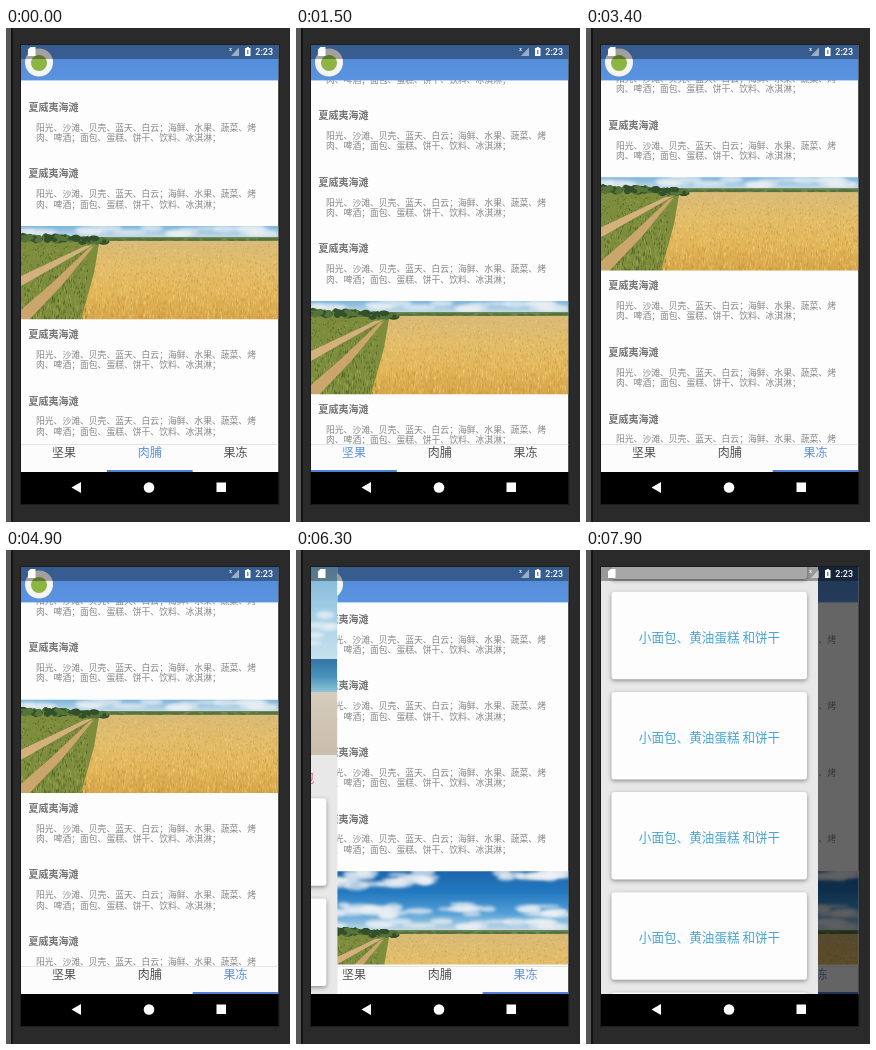
Recreate the animation shown at these times as an HTML page with a canvas. Size 284x494 px, loop 8000 ms.

```html
<!DOCTYPE html>
<html lang="zh-CN">
<head>
<meta charset="utf-8">
<style>
html, body { margin: 0; width: 284px; height: 494px; overflow: hidden; background: #2a2a2a; }
canvas { display: block; width: 284px; height: 494px; }
</style>
</head>
<body>
<canvas id="stage"></canvas>
<script>
const W = 284, H = 494, LOOP = 8000, STEP = 100;
const X = 15, PAGE_W = 257.5, TOP = 17, BAR = 31, LIST = 52.4, TABS = 416, NAV = 444, END = 476;
const ITEM_H = 66.6, PHOTO_H = 93.3, PHOTO_REST = 321.2, PHOTO_SHIFT = 48;
const DRAWER_W = 217, CARD_GAP = 100.2, CARD_SCROLL = 306.8;
const FONT = '"Noto Sans CJK SC", "Noto Sans CJK", sans-serif';
const UI_FONT = 'Roboto, sans-serif';

const dpr = window.devicePixelRatio || 1;
const canvas = document.getElementById('stage');
canvas.width = W * dpr;
canvas.height = H * dpr;
const ctx = canvas.getContext('2d');
const clamp = (v, a, b) => Math.min(b, Math.max(a, v));
const mix = (a, b, k) => a + (b - a) * k;

// Eased progress from 0 to 1; a power above 1 delays the speed peak
function ease(t, start, end, power = 1) {
  const k = clamp((t - start) / (end - start), 0, 1) ** power;
  return k * k * (3 - 2 * k);
}

const pagerAt = t => 1 - ease(t, 1300, 1500) + 2 * ease(t, 3100, 3400);
const scrollAt = [
  t => mix(273, PHOTO_REST, ease(t, 2100, 2700)),
  t => mix(198, 150, ease(t, 400, 1300)),
  t => mix(149.3, PHOTO_REST, ease(t, 4800, 5900, 1.44))
];
const drawerAt = t => DRAWER_W * ease(t, 6200, 6800, .85);
const drawerScrollAt = t => CARD_SCROLL * ease(t, 7500, 7900);

function random(seed) {
  return () => (seed = (seed * 16807) % 2147483647) / 2147483647;
}

function rect(g, x, y, w, h, fill) {
  g.fillStyle = fill;
  g.fillRect(x, y, w, h);
}

function oval(g, x, y, rx, ry, fill) {
  g.fillStyle = fill;
  g.beginPath();
  g.ellipse(x, y, rx, ry, 0, 0, Math.PI * 2);
  g.fill();
}

function poly(g, fill, ...p) {
  g.fillStyle = fill;
  g.beginPath();
  for (let i = 0; i < p.length; i += 2) g.lineTo(p[i], p[i + 1]);
  g.fill();
}

function gradient(g, y0, y1, ...colors) {
  const fill = g.createLinearGradient(0, y0, 0, y1);
  colors.forEach((c, i) => fill.addColorStop(i / (colors.length - 1), c));
  return fill;
}

function text(s, x, y, size, color, align = 'left', weight = 400, font = FONT) {
  ctx.font = `${weight} ${size}px ${font}`;
  ctx.textAlign = align;
  ctx.fillStyle = color;
  ctx.fillText(s, x, y + size * .37);
}

function clipped(x, y, w, h, draw) {
  ctx.save();
  ctx.beginPath();
  ctx.rect(x, y, w, h);
  ctx.clip();
  draw();
  ctx.restore();
}

function picture(w, h, draw) {
  const c = document.createElement('canvas');
  c.width = w * 2;
  c.height = h * 2;
  const g = c.getContext('2d');
  g.scale(2, 2);
  draw(g, w, h);
  return c;
}

function clouds(g, rnd, n, x, y, w, h) {
  g.save();
  g.filter = 'blur(3px)';
  for (let i = 0; i < n; i++) {
    oval(g, x + rnd() * w, y + rnd() * h, 6 + rnd() * 12, 1.5 + rnd() * 3, 'rgba(240,243,246,.7)');
  }
  g.restore();
}

function specks(g, rnd, n, x, y, w, h, light, dark) {
  for (let i = 0; i < n; i++) {
    const d = rnd();
    rect(g, x + rnd() * w, y + d * h, .8, 1 + d * 3, rnd() < .5 ? light : dark);
  }
}

const field = picture(258, 142, (g, w, h) => {
  const rnd = random(77);
  rect(g, 0, 0, w, 63, gradient(g, 0, 63, '#1d66ac', '#2479c0', '#539fd6', '#dce8ec'));
  clouds(g, rnd, 26, 15, 0, 100, 15);
  clouds(g, rnd, 14, 190, 0, 70, 10);
  clouds(g, rnd, 30, 20, 33, 240, 12);
  clouds(g, rnd, 16, 0, 50, w, 6);

  rect(g, 0, 59, w, 5, '#6f8750');
  rect(g, 0, 63, w, h - 63, gradient(g, 63, h, '#d9bb78', '#e2bd69', '#e2b659', '#d6a548'));
  specks(g, rnd, 1800, 62, 65, 196, 77, 'rgba(250,222,145,.4)', 'rgba(176,122,42,.3)');

  poly(g, '#7d8d3d', 0, 62, 74, 62, 78, 66, 73, 95, 60, h, 0, h);
  specks(g, rnd, 700, 0, 66, 66, 76, 'rgba(170,176,84,.5)', 'rgba(50,78,24,.5)');
  poly(g, '#d3b07c', 72, 67, 64, 68, 0, 98, 0, 108);
  poly(g, '#cba66c', 73, 68, 68, 70, 30, 106, 0, 132, 0, h, 8, h, 42, 106);
  for (let i = 0; i < 110; i++) {
    const x = rnd() * 85;
    oval(g, x, 62 - rnd() * 5 + x / 28, 2 + rnd() * 3, 1.2 + rnd() * 2, rnd() < .6 ? '#34502a' : '#557439');
  }
  for (let i = 0; i < 50; i++) oval(g, 85 + rnd() * 173, 61 + rnd(), 4, 1, '#55733f');
});

const beach = picture(DRAWER_W, 188, (g, w, h) => {
  const rnd = random(31);
  rect(g, 0, 0, w, 92, gradient(g, 0, 92, '#7fb4d8', '#a4cfe6', '#c6e2ee'));
  clouds(g, rnd, 36, 0, 35, w, 45);
  rect(g, 0, 92, w, 34, gradient(g, 92, 126, '#3475a5', '#4692bd', '#94c9d8'));
  rect(g, 0, 125, w, h - 125, gradient(g, 125, h, '#d6cdbe', '#d0c5b5', '#c9bdac'));
});

function drawList(x, photoY) {
  const drawItem = y => {
    if (y > TABS || y + ITEM_H < LIST) return;
    text('夏威夷海滩', x + 7.5, y + 14.3, 10, '#757575', 'left', 700);
    text('阳光、沙滩、贝壳、蓝天、白云；海鲜、水果、蔬菜、烤', x + 15, y + 34.6, 8.8, '#858585');
    text('肉、啤酒；面包、蛋糕、饼干、饮料、冰淇淋；', x + 15, y + 44.9, 8.8, '#858585');
  };
  for (let i = 0; i < 6; i++) {
    if (i < 4) drawItem(photoY - (i + 1) * ITEM_H);
    drawItem(photoY + PHOTO_H + .7 + i * ITEM_H);
  }
  // The photo stays still on screen until its lower edge is reached
  const shift = clamp(PHOTO_REST - photoY, 0, PHOTO_SHIFT);
  clipped(x, photoY, PAGE_W, PHOTO_H, () => ctx.drawImage(field, x, photoY - shift, 258, 142));
}

function drawTabs(pos, active) {
  const w = PAGE_W / 3;
  rect(ctx, X, TABS, PAGE_W, NAV - TABS, '#fcfcfc');
  rect(ctx, X, TABS, PAGE_W, 1, '#e4e4e4');
  ['坚果', '肉脯', '果冻'].forEach((s, i) =>
    text(s, X + w * (i + .5), 424.5, 12, i === active ? '#5b91e0' : '#505050', 'center'));
  rect(ctx, X + w * pos, NAV - 2, w, 2, '#4f80d6');
}

function drawDrawer(open, scroll) {
  if (!open) return;
  const dim = .6 * clamp(open / DRAWER_W * 1.15 - .15, 0, 1);
  rect(ctx, X, TOP, PAGE_W, NAV - TOP, `rgba(0,0,0,${dim})`);
  const x = X + open - DRAWER_W;
  rect(ctx, x, TOP, DRAWER_W, NAV - TOP, '#e9e8e8');
  ctx.drawImage(beach, x, TOP - scroll, DRAWER_W, 188);
  text('海鲜、水果、蔬菜、烤肉和面包', x + 194, 227 - scroll, 12.6, '#e0558c', 'right');
  for (let i = 0; i < 8; i++) {
    const y = 248.3 + i * CARD_GAP - scroll;
    if (y > NAV || y < -CARD_GAP) continue;
    ctx.save();
    ctx.shadowColor = 'rgba(0,0,0,.4)';
    ctx.shadowBlur = 4 * dpr;
    ctx.shadowOffsetY = 1.5 * dpr;
    ctx.fillStyle = '#fdfdfd';
    ctx.beginPath();
    ctx.roundRect(x + 10.5, y, 195.5, 87.5, 3);
    ctx.fill();
    ctx.restore();
    text('小面包、黄油蛋糕 和饼干', x + 108.5, y + 45.3, 12.6, '#45a5d2', 'center');
  }
}

function drawStatus() {
  rect(ctx, X, TOP, PAGE_W, BAR - TOP, 'rgba(0,0,0,.34)');
  poly(ctx, '#fff', 24.5, 19, 29.5, 19, 29.5, 28, 22, 28, 22, 21.5);
  poly(ctx, 'rgba(255,255,255,.5)', 233, 19.5, 233, 28, 225, 28);
  text('x', 224.5, 21, 5, '#fff', 'center', 700, UI_FONT);
  rect(ctx, 239, 20, 5.5, 8, '#fff');
  rect(ctx, 240.7, 19, 2.2, 1, '#fff');
  rect(ctx, 241.2, 22, 1.2, 4, '#50709f');
  text('2:23', 267, 24, 9, '#fff', 'right', 500, UI_FONT);
}

function drawNav() {
  rect(ctx, X, NAV, PAGE_W, END - NAV, '#000');
  poly(ctx, '#fff', 65.5, 459.5, 75, 454, 75, 465);
  oval(ctx, 143, 459.5, 5.3, 5.3, '#fff');
  rect(ctx, 210.5, 454.5, 9.5, 9.5, '#fff');
}

function drawPhone() {
  rect(ctx, 0, 0, W, H, '#2a2a2a');
  rect(ctx, 0, 0, 5, H, '#565656');
  rect(ctx, 5, 0, 2, H, '#141414');
  rect(ctx, X - 1, TOP - 1, PAGE_W + 2, END - TOP + 2, '#1c1c1c');
}

function draw(t) {
  const pos = pagerAt(t);
  ctx.setTransform(dpr, 0, 0, dpr, 0, 0);
  drawPhone();
  clipped(X, TOP, PAGE_W, END - TOP, () => {
    rect(ctx, X, TOP, PAGE_W, TABS - TOP, '#fdfdfd');
    scrollAt.forEach((at, i) => {
      if (Math.abs(i - pos) < 1) drawList(X + (i - pos) * PAGE_W, at(t));
    });
    rect(ctx, X, TOP, PAGE_W, LIST - TOP, gradient(ctx, TOP, LIST, '#528ad7', '#5a93df'));
    oval(ctx, 33, 34.5, 14, 14, '#f4f5f3');
    oval(ctx, 33, 35, 8, 8, '#8db543');
    drawTabs(pos, t < 1400 ? 1 : t < 3200 ? 0 : 2);
    drawDrawer(drawerAt(t), drawerScrollAt(t));
    drawStatus();
    drawNav();
  });
}

// The screen refreshes ten times a second
const start = performance.now();
function frame() {
  const t = (performance.now() - start + 8) % LOOP;
  draw(Math.floor(t / STEP) * STEP);
  requestAnimationFrame(frame);
}
frame();
</script>
</body>
</html>
```
